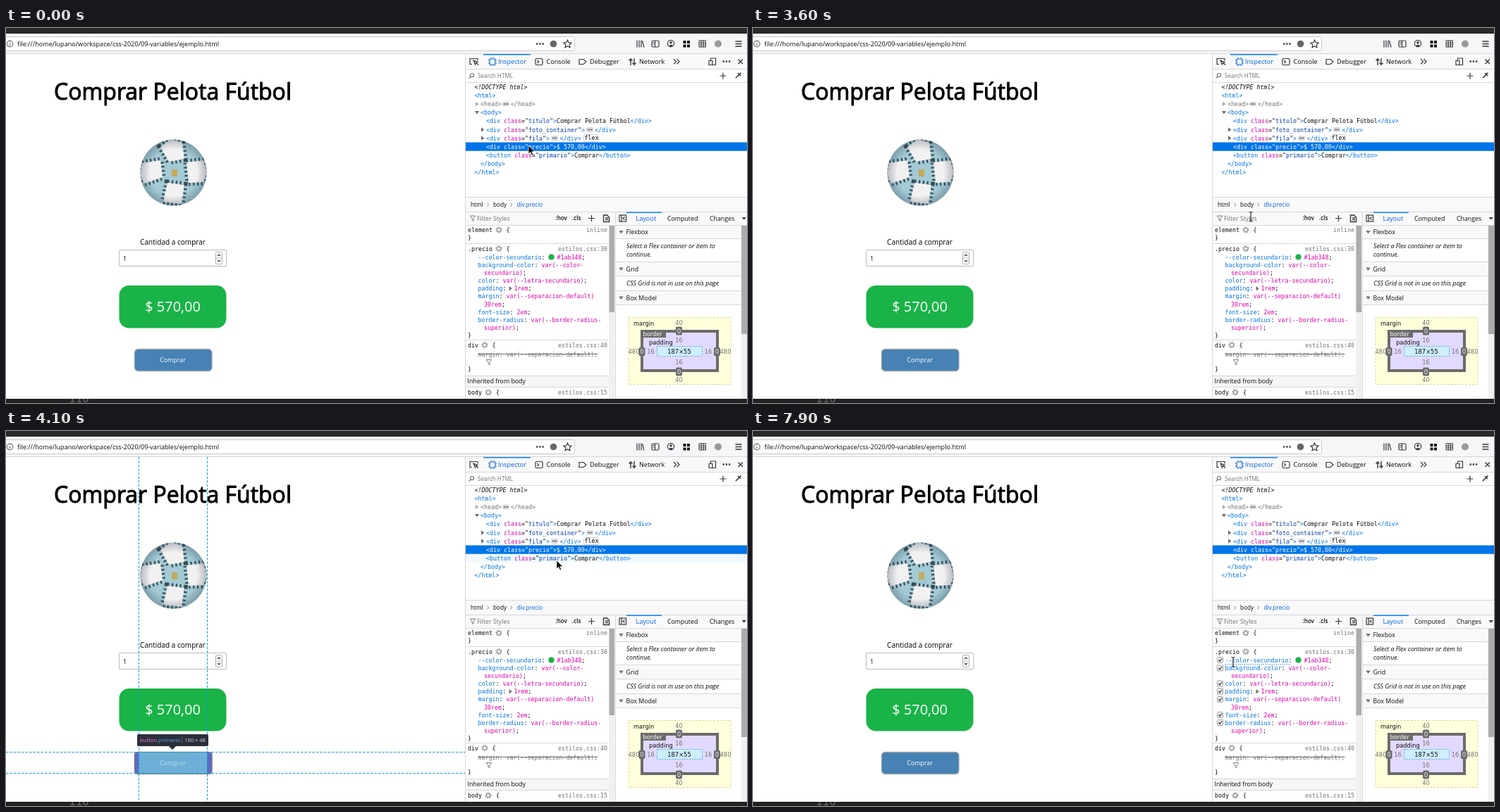
Recreate the animation shown at these times as an HTML page. Size 1051x533 px, loop 8000 ms.

```html
<!DOCTYPE html>
<html lang="es">
<head>
<meta charset="utf-8">
<title>Variables CSS</title>
<style>
html, body { margin: 0; width: 100%; height: 100%; overflow: hidden; background: #fff; }
svg { display: block; }
text { font: 8.8px "Open Sans", "Noto Sans", sans-serif; fill: #0c0c0d; white-space: pre; }
.title { font-size: 32px; fill: #000; stroke: #000; stroke-width: 1; stroke-linejoin: round; }
.label { font-size: 10.05px; fill: #000; }
.total { font-size: 20px; fill: #fff; }
.buy { font-size: 8.9px; fill: #fff; }
.tab { font-size: 9.1px; }
.crumb { font-size: 8.2px; }
.pseudo { font-size: 8px; font-weight: 600; }
.head { font-weight: 500; }
.dim { fill: #737373; }
.blue { fill: #0060df; }
.it { font-style: italic; }
.mid { text-anchor: middle; }
.end { text-anchor: end; }
.mono text, text.mono { font: 8.3px "DejaVu Sans Mono", monospace; }
.mono .it { font-style: italic; }
.mono .end { fill: #737373; }
.box text { font: 8.3px "DejaVu Sans", sans-serif; }
.t, .p { fill: #0074e8; }
.a, .v { fill: #dd00a9; }
.s { fill: #003eaa; }
.sel { fill: #fff; }
.line { fill: none; stroke: #38383d; stroke-width: 1.2; }
.dots { stroke: #444; stroke-width: 2.4; stroke-dasharray: 2.4 1.8; }
.rule { stroke: #d7d7db; fill: none; }
.guide { fill: none; stroke: #149ad2; stroke-dasharray: 3.44 2.06; }
.tip path { fill: #2b2f3a; }
.tip text { font-size: 7.7px; fill: #d7d7db; }
.tip .size { font-size: 7.4px; }
.tip .n { fill: #ee7be6; }
.tip .c { fill: #5fa9e8; }

.price, .body, .button, .row, .bodyRow, .checks, .name, .value, .arrow, .beam, .cursor {
  animation: 8s step-end infinite;
}
.price { animation-name: price; }
.body, .bodyRow { animation-name: body; }
.button { animation-name: button; }
.row { animation-name: row; }
.checks { animation-name: checks; }
.name { animation-name: name; }
.value { animation-name: value; }
.arrow { animation-name: arrow; }
.beam { animation-name: beam; }
.cursor { animation-name: move; }

@keyframes price { 0%, 37.5%, 65%, 100% { opacity: 0 } 2.5%, 53.75% { opacity: 1 } }
@keyframes body { 0%, 43.75%, 100% { opacity: 0 } 37.5% { opacity: 1 } }
@keyframes button { 0%, 53.75%, 66.25%, 100% { opacity: 0 } 51.25%, 65% { opacity: 1 } }
@keyframes row { 0%, 53.75%, 66.25%, 100% { opacity: 0 } 51.25%, 63.75% { opacity: 1 } }
@keyframes checks { 0%, 100% { opacity: 0 } 67.5% { opacity: 1 } }
@keyframes name { 0%, 81.25%, 100% { opacity: 0 } 72.5%, 92.5% { opacity: 1 } }
@keyframes value { 0%, 72.5%, 85%, 90%, 100% { opacity: 0 } 68.75%, 82.5%, 86.25% { opacity: 1 } }
@keyframes arrow { 0%, 48.75%, 100% { opacity: 1 } 45%, 67.5% { opacity: 0 } }
@keyframes beam { 0%, 48.75%, 100% { opacity: 0 } 45%, 67.5% { opacity: 1 } }
@keyframes move {
  0% { transform: translate(741px, 167px) }
  1.25% { transform: translate(740px, 167px) }
  2.5% { transform: translate(738px, 167px) }
  12.5% { transform: translate(767px, 163px) }
  13.75% { transform: translate(740px, 167px) }
  20% { transform: translate(721px, 165px) }
  21.25% { transform: translate(712px, 166px) }
  22.5% { transform: translate(702px, 168px) }
  23.75% { transform: translate(695px, 171px) }
  26.25% { transform: translate(696px, 171px) }
  27.5% { transform: translate(698px, 170px) }
  28.75% { transform: translate(699px, 169px) }
  30% { transform: translate(698px, 170px) }
  36.25% { transform: translate(697px, 178px) }
  37.5% { transform: translate(696px, 187px) }
  38.75% { transform: translate(696px, 192px) }
  43.75% { transform: translate(700px, 225px) }
  45% { transform: translate(706px, 268px) }
  46.25% { transform: translate(710px, 271px) }
  48.75% { transform: translate(762px, 198px) }
  50% { transform: translate(772px, 191px) }
  51.25% { transform: translate(781px, 184px) }
  52.5% { transform: translate(790px, 176px) }
  53.75% { transform: translate(797px, 165px) }
  56.25% { transform: translate(799px, 168px) }
  63.75% { transform: translate(790px, 189px) }
  65% { transform: translate(790px, 215px) }
  66.25% { transform: translate(792px, 252px) }
  67.5% { transform: translate(796px, 300px) }
  68.75% { transform: translate(803px, 328px) }
  71.25% { transform: translate(790px, 328px); animation-timing-function: steps(3) }
  75% { transform: translate(700px, 328px) }
  77.5% { transform: translate(706px, 328px); animation-timing-function: steps(6) }
  85% { transform: translate(822px, 328px); animation-timing-function: steps(2) }
  87.5% { transform: translate(800px, 328px) }
  88.75% { transform: translate(795px, 328px); animation-timing-function: steps(8) }
  98.75%, 100% { transform: translate(681px, 328px) }
}
</style>
</head>
<body>
<svg width="1051" height="533" viewBox="0 0 1051 533">
<defs>
  <path id="open" d="M-3.2-2h6.4L0 2.4z" fill="#737373"/>
  <path id="shut" d="M-2-3.2v6.4L2.4 0z" fill="#737373"/>
  <g id="more"><rect x="-5" y="-4" width="10" height="7" rx="2" fill="#dcdce0"/><path d="M-3-.5H4" stroke="#38383d" stroke-width="1.4" stroke-dasharray="1.4 1"/></g>
  <g id="gear" fill="none" stroke="#777"><circle r="2.6"/><circle r="3.9" stroke-width="1.4" stroke-dasharray="1.3 1.76"/></g>
  <g id="check"><rect x="-4" y="-4" width="8" height="8" rx="1" fill="#fff" stroke="#999"/><path d="M-2.2 0-.5 2 2.4-2.2" fill="none" stroke="#333" stroke-width="1.3"/></g>
  <path id="funnel" d="M-3.8-3.5h7.6L1 0v4L-1 2.6V0z" fill="none" stroke="#737373" stroke-width=".9"/>
  <g id="zero"><rect x="-4.5" y="-6" width="9" height="12" rx="2" fill="#6b6b6b"/><text class="mid sel" y="3">0</text></g>
  <clipPath id="foot"><path d="M0 527h651v6H0z"/></clipPath>
  <clipPath id="disc"><circle cx="237.5" cy="205.5" r="47"/></clipPath>
  <radialGradient id="shade"><stop offset=".7" stop-color="#234" stop-opacity="0"/><stop offset="1" stop-color="#234" stop-opacity=".3"/></radialGradient>
  <path id="panels" d="M219 169 234 158 250 163 253 186 231 190zM193 192l26-4 3 24-26 9-6-12zM256 191l24-3 5 18-5 13-21 1zM229 220l24 3-4 27-26-3z"/>
</defs>

<!-- browser bar -->
<path d="M0 0h1051v533H0z" fill="#fff"/>
<path d="M0 0h1051v8H0z" fill="#292929"/>
<path d="M0 8h1051v29H0z" fill="#f5f6f7"/>
<rect x="-6" y="12.5" width="812.5" height="20" rx="2" fill="#fff" stroke="#c9c9ce"/>
<path class="rule" d="M0 36.5h1051"/>
<g class="line"><circle cx="5.5" cy="22.5" r="4.3" stroke="#737373"/><path d="M5.5 21.5v3.4M5.5 19.4v1.2" stroke="#737373"/></g>
<text class="tab" x="16" y="25.5">file:///home/lupano/workspace/css-2020/09-variables/ejemplo.html</text>
<path class="dots" d="M752 22.5h11"/>
<circle cx="776.5" cy="22.5" r="4.8" fill="#666"/>
<path class="line" d="m796.5 17 1.6 3.7 4 .4-3 2.7.9 4-3.5-2.1-3.5 2.1.9-4-3-2.7 4-.4z"/>
<g class="line">
  <path d="M895 17.5v10M898 17.5v10M901 17.5v10M902.5 18l2.5 9.5"/>
  <rect x="916" y="18" width="10" height="9" rx="1.5"/><path d="M920.5 18v9M917.5 20.5h2M917.5 23h2"/>
  <circle cx="943" cy="22" r="4.6"/>
  <path d="M983 17.8h9.5V27H983zM983 21h9.5M983 24h9.5M986.2 17.8V27M989.4 17.8V27" stroke-width="1"/>
  <path d="M1034.5 19h9M1034.5 22.5h9M1034.5 26h9" stroke-width="1.5"/>
</g>
<path d="M940 25.5q3-3.5 6 0l-3 1.5zM941.3 20.7a1.7 1.7 0 1 1 3.4 0 1.7 1.7 0 1 1-3.4 0" fill="#38383d"/>
<path d="M960.5 18h4v4h-4zM966 18h4v4h-4zM960.5 23.5h4v4h-4zM966 23.5h4v4h-4z" fill="#111"/>
<circle cx="1010" cy="22.5" r="5" fill="#999"/>

<!-- page -->
<text class="title" x="68" y="102">Comprar Pelota Fútbol</text>
<g clip-path="url(#disc)">
  <path d="M190 158h95v95h-95z" fill="#a3cad5"/>
  <use href="#panels" fill="none" stroke="#3a4c56" stroke-width="9" stroke-dasharray="2.2 3.6"/>
  <use href="#panels" fill="#f2f1f2"/>
  <path d="M235 201h8v10h-8z" fill="#c3aa5c"/>
  <circle cx="237.5" cy="205.5" r="47.5" fill="url(#shade)"/>
</g>
<text class="label mid" x="236.5" y="307.5">Cantidad a comprar</text>
<rect x="160.5" y="315.5" width="152" height="23" rx="1.5" fill="#fff" stroke="#bbb"/>
<text class="tab" x="166" y="330.5">1</text>
<rect x="297.5" y="318.5" width="9" height="17" rx="2" fill="#fff" stroke="#aaa"/>
<path d="M298 327h9" stroke="#bbb"/><path class="line" d="m300 324 2-2 2 2M300 330l2 2 2-2"/>
<rect x="160.5" y="366" width="152" height="60.5" rx="14" fill="#1ab348"/>
<text class="total mid" x="236.5" y="403">$ 570,00</text>
<rect x="182.5" y="456.5" width="109.5" height="31" rx="5" fill="#4682b4" stroke="#9ba3aa" stroke-width="1.3"/>
<text class="buy mid" x="236.5" y="474.5">Comprar</text>

<!-- highlighters -->
<g class="body">
  <path d="M0 66h646v424H0z" fill="#87ceeb" opacity=".6"/>
  <path class="guide" d="M645.5 37v490M0 66.5h651M0 489.5h651"/>
</g>
<g class="price">
  <g opacity=".6" fill-rule="evenodd">
    <path d="M0 338h646v116H0z M161 366v61h151.5v-61z" fill="#edff64"/>
    <path d="M161 366h151.5v61H161z M172 377.5v38h129.5v-38z" fill="#6a5acd"/>
    <path d="M172 377.5h129.5v38H172z" fill="#87ceeb"/>
  </g>
  <path class="guide" d="M171.5 37v490M301.5 37v490M0 377.5h651M0 415.5h651"/>
  <g class="tip">
    <path d="M198 315h76q2 0 2 2v13q0 2-2 2h-33l-5 5-5-5h-33q-2 0-2-2v-13q0-2 2-2z"/>
    <text x="200" y="326.3"><tspan class="n">div</tspan><tspan class="c">.precio</tspan></text>
    <path d="M239.5 319v9" stroke="#666"/>
    <text class="size" x="243.5" y="326.3">219 × 87</text>
  </g>
</g>
<g class="button">
  <g opacity=".6">
    <path d="M182 456h110.5v31.5H182z" fill="#555"/>
    <path d="M183 457h108.5v30H183z" fill="#6a5acd"/>
    <path d="M188 457h97v30h-97z" fill="#87ceeb"/>
  </g>
  <path class="guide" d="M188.5 37v490M285.5 37v490M0 456.5h651M0 486.5h651"/>
  <g class="tip">
    <path d="M188 431h97q2 0 2 2v13q0 2-2 2h-44l-5 5-5-5h-43q-2 0-2-2v-13q0-2 2-2z"/>
    <text x="190" y="442.3"><tspan class="n">button</tspan><tspan class="c">.primario</tspan></text>
    <path d="M249.5 435v9" stroke="#666"/>
    <text class="size" x="253.5" y="442.3">160 × 48</text>
  </g>
</g>

<!-- devtools tabs -->
<path d="M651 37h400v490H651z" fill="#fff"/>
<path d="M652 37h399v21H652zM652 241h399v39H652z" fill="#f9f9fa"/>
<path class="rule" d="M651.5 37v490M652 58.5h399M652 77.5h399M652 240.5h399M652 261.5h399M652 280.5h399"/>
<path d="M677 37h67v1.4h-67zM880 261.5h50v1.4h-50z" fill="#0a84ff"/>
<g class="line">
  <path d="M661 51.5h-3v-8h11v3M663 46l6 2.5-2.5 1-1 2.5zM667 49.5l3 3"/>
  <g stroke="#0060df"><rect x="686" y="44" width="8" height="8" rx="1"/><path d="M684 46h1M684 50h1M695 46h1M695 50h1M688 42v1M692 42v1M688 53v1M692 53v1"/></g>
  <rect x="751" y="43.5" width="10" height="9" rx="1.5"/><path d="m753.5 46 2 2-2 2"/>
  <path d="M813 44.5h6l4 3.5-4 3.5h-6z"/>
  <path d="M886 53v-9l-2.5 2.5M886 44l2.5 2.5M891 43v9l-2.5-2.5M891 52l2.5-2.5" stroke-width="1.4"/>
  <path d="m947 44 3.5 3.7-3.5 3.7M951.5 44l3.5 3.7-3.5 3.7"/>
  <path d="M999.5 46v-3h7v9.5h-4M997 46.5h5v6h-5z"/>
  <path d="m1038.5 44.5 6.5 6.5M1045 44.5l-6.5 6.5" stroke-width="1.4"/>
  <circle cx="661" cy="67" r="2.5" stroke="#737373"/><path d="m659 69-2.5 2.5" stroke="#737373"/>
  <path d="M1012.5 68h9M1017 63.5v9"/><path d="m1035 71 4.5-4.5M1038 64l4 4M1040 66l2.5-2.5" stroke-width="1.7"/>
</g>
<path class="dots" d="M1016.5 47.5h11"/>
<text class="tab blue" x="698" y="51">Inspector</text>
<text class="tab" x="766.5" y="51">Console</text>
<text class="tab" x="828" y="51">Debugger</text>
<text class="tab" x="898" y="51">Network</text>
<text class="crumb dim" x="669" y="71">Search HTML</text>

<!-- markup tree -->
<path class="row" d="M652 174.7h399v12.1H652z" fill="#f0f9fe"/>
<path class="bodyRow" d="M652 186.8h399v12.1H652z" fill="#f0f9fe"/>
<path d="M652 162.6h399v12.1H652z" fill="#0074e8"/>
<g class="mono">
  <text class="it" x="664.5" y="87">&lt;!DOCTYPE html&gt;</text>
  <text class="t" x="664.5" y="99">&lt;html&gt;</text>
  <text class="dim" x="673" y="111">&lt;head&gt;</text><text class="dim" x="716" y="111">&lt;/head&gt;</text>
  <text class="t" x="673" y="123">&lt;body&gt;</text>
  <text x="681" y="135.3"><tspan class="t">&lt;div </tspan><tspan class="a">class</tspan>="<tspan class="s">titulo</tspan>"<tspan class="t">&gt;</tspan>Comprar Pelota Fútbol<tspan class="t">&lt;/div&gt;</tspan></text>
  <text x="681" y="147.5"><tspan class="t">&lt;div </tspan><tspan class="a">class</tspan>="<tspan class="s">foto_container</tspan>"<tspan class="t">&gt;</tspan></text>
  <text class="t" x="835" y="147.5">&lt;/div&gt;</text>
  <text x="681" y="159.6"><tspan class="t">&lt;div </tspan><tspan class="a">class</tspan>="<tspan class="s">fila</tspan>"<tspan class="t">&gt;</tspan></text>
  <text class="t" x="785.5" y="159.6">&lt;/div&gt;</text>
  <text class="sel" x="681" y="172">&lt;div class="precio"&gt;$ 570,00&lt;/div&gt;</text>
  <text x="681" y="184"><tspan class="t">&lt;button </tspan><tspan class="a">class</tspan>="<tspan class="s">primario</tspan>"<tspan class="t">&gt;</tspan>Comprar<tspan class="t">&lt;/button&gt;</tspan></text>
  <text class="t" x="673" y="196">&lt;/body&gt;</text>
  <text class="t" x="664.5" y="208.3">&lt;/html&gt;</text>
  <rect x="819.5" y="151.5" width="21" height="10" rx="2" fill="#fafafa" stroke="#d0d0d4"/>
  <text x="820.5" y="159.3">flex</text>
</g>
<use href="#shut" x="668" y="108" opacity=".6"/><use href="#open" x="668" y="120"/>
<use href="#shut" x="676" y="144.5"/><use href="#shut" x="676" y="156.5"/>
<use href="#more" x="709" y="108.5"/><use href="#more" x="828" y="145"/><use href="#more" x="778" y="157"/>

<!-- breadcrumbs and toolbars -->
<text class="crumb" x="659" y="254">html</text>
<text class="crumb" x="691" y="254">body</text>
<text class="crumb blue" x="724.5" y="254">div.precio</text>
<path d="m682.5 248.5 2.2 2.5-2.2 2.5M715.5 248.5l2.2 2.5-2.2 2.5" fill="none" stroke="#888"/>
<use href="#funnel" x="662" y="270.5"/>
<text class="dim" x="668" y="273.5">Filter Styles</text>
<text class="pseudo" x="779.5" y="273.3">:hov</text>
<text class="pseudo" x="803" y="273.3">.cls</text>
<g class="line">
  <path d="M826 270.5h9M830.5 266v9"/>
  <path d="M847.5 266h5l3 3v6.5h-8zM850 270h4M850 272.5h4" stroke-width="1.4"/>
  <rect x="870" y="266" width="9.5" height="9"/><path d="M873 266v9M877.5 268.5l-2.5 2 2.5 2"/>
</g>
<text class="tab blue" x="893.5" y="273.5">Layout</text>
<text x="938" y="273.5">Computed</text>
<text x="998" y="273.5">Changes</text>
<path d="M1043.5 269h6.5l-3.2 3.5z" fill="#38383d"/>

<!-- style rules -->
<path d="M652 495h203v15H652z" fill="#f5f5f6"/>
<path class="rule" d="M652 306.5h203M652 443.5h203M652 494.5h203M652 510.5h203"/>
<g class="mono">
  <text x="655" y="290">element</text><text x="709.5" y="290">{</text><text class="end" x="853" y="290">inline</text>
  <text x="655" y="301">}</text>
  <text x="655" y="316.5">.precio</text><text x="709.5" y="316.5">{</text><text class="end" x="853" y="316.5">estilos.css:30</text>
  <text x="669.5" y="328.6"><tspan class="p">--color-secundario</tspan>:</text><text x="781.5" y="328.6"><tspan class="v">#1ab348</tspan>;</text>
  <text x="669.5" y="339.8"><tspan class="p">background-color</tspan>: <tspan class="v">var(--color-</tspan></text>
  <text x="678" y="351"><tspan class="v">secundario)</tspan>;</text>
  <text x="669.5" y="362"><tspan class="p">color</tspan>: <tspan class="v">var(--letra-secundario)</tspan>;</text>
  <text x="669.5" y="373.2"><tspan class="p">padding</tspan>:</text><text x="720.5" y="373.2"><tspan class="v">1rem</tspan>;</text>
  <text x="669.5" y="384.4"><tspan class="p">margin</tspan>: <tspan class="v">var(--separacion-default)</tspan></text>
  <text x="678" y="395.6"><tspan class="v">30rem</tspan>;</text>
  <text x="669.5" y="406.8"><tspan class="p">font-size</tspan>: <tspan class="v">2em</tspan>;</text>
  <text x="669.5" y="418"><tspan class="p">border-radius</tspan>: <tspan class="v">var(--border-radius-</tspan></text>
  <text x="678" y="429"><tspan class="v">superior)</tspan>;</text>
  <text x="655" y="439.5">}</text>
  <text x="655" y="453.5">div</text><text x="689.5" y="453.5">{</text><text class="end" x="853" y="453.5">estilos.css:40</text>
  <text class="dim" x="669.5" y="466.5">margin: var(--separacion-default);</text>
  <text x="655" y="488">}</text>
  <text x="655" y="521">body</text><text x="695" y="521">{</text><text class="end" x="853" y="521">estilos.css:15</text>
</g>
<path d="M669.5 463.5h170" stroke="#777"/>
<circle cx="773.5" cy="325.5" r="4.3" fill="#1ab348" stroke="#ccc" stroke-width=".6"/>
<use href="#shut" x="715.5" y="370.3"/>
<use href="#gear" x="699" y="287"/><use href="#gear" x="699" y="313.5"/><use href="#gear" x="679" y="450.5"/><use href="#gear" x="684" y="518"/>
<use href="#funnel" x="685" y="475"/>
<text class="head" x="654.5" y="504.5">Inherited from body</text>
<g class="checks">
  <use href="#check" x="662.5" y="325.5"/><use href="#check" x="662.5" y="337"/><use href="#check" x="662.5" y="359"/>
  <use href="#check" x="662.5" y="370"/><use href="#check" x="662.5" y="381.5"/><use href="#check" x="662.5" y="403.5"/><use href="#check" x="662.5" y="414.5"/>
</g>
<path class="name" d="M669.5 331.5H761" stroke="#4b8fd6" stroke-dasharray="1.5"/>
<path class="value" d="M781.5 331.5H817" stroke="#dd00a9" stroke-dasharray="1.5"/>
<path d="M855 281h8.5v246H855zM1043 281h8v246h-8z" fill="#f0f0f0"/>
<path d="M855.5 281h7.5v123h-7.5zM1043 281h8v154h-8z" fill="#acacac"/>
<path class="rule" d="M864.5 262v265"/>

<!-- layout panel -->
<path d="M865 281h178v18H865zM865 333h178v19H865zM865 374h178v19H865z" fill="#f9f9fa"/>
<path class="rule" d="M865 299.5h178M865 332.5h178M865 352.5h178M865 373.5h178M865 393.5h178"/>
<use href="#open" x="872.5" y="290"/><use href="#open" x="872.5" y="342.5"/><use href="#open" x="872.5" y="383.5"/>
<text class="head" x="879.5" y="292.5">Flexbox</text>
<text class="head" x="879.5" y="345.5">Grid</text>
<text class="head" x="879.5" y="386.5">Box Model</text>
<text class="it" x="880" y="313">Select a Flex container or item to</text>
<text class="it" x="880" y="325">continue.</text>
<text class="it" x="880" y="366">CSS Grid is not in use on this page</text>
<g class="box">
  <rect x="883" y="411.5" width="145" height="95" fill="#ffffdb" stroke="#d9d98a" stroke-dasharray="3 2"/>
  <rect x="902" y="431" width="107" height="56" fill="#e2d9ff" stroke="#6b6b6b" stroke-width="4"/>
  <rect x="923.5" y="452.5" width="64" height="14" fill="#cdeefb" stroke="#5fb4d8" stroke-dasharray="2 1.5"/>
  <path d="M902 430h34v10h-34z" fill="#6b6b6b"/>
  <text x="890" y="423">margin</text>
  <text class="sel" x="903.5" y="438">border</text>
  <text x="912" y="450">padding</text>
  <text class="mid" x="955" y="463">187×55</text>
  <g class="mid">
    <text class="dim" x="954.5" y="421.5">40</text><text class="dim" x="954.5" y="503">40</text>
    <text class="dim" x="954.5" y="447">16</text><text class="dim" x="954.5" y="478">16</text>
    <text class="dim" x="914.5" y="463">16</text><text class="dim" x="996" y="463">16</text>
    <text class="dim" x="890.5" y="463">480</text><text class="dim" x="1020.5" y="463">480</text>
  </g>
  <use href="#zero" x="954.5" y="430.5"/><use href="#zero" x="954.5" y="488.5"/>
  <use href="#zero" x="902" y="460"/><use href="#zero" x="1008.5" y="460"/>
</g>

<!-- editor strip below -->
<path d="M0 527h1051v6H0z" fill="#222"/>
<g clip-path="url(#foot)"><text class="mono" x="89" y="532" style="font-size:16px;fill:#686868">110</text></g>

<g class="cursor">
  <path class="arrow" d="M0 0v12l2.8-2.6 1.9 4.3 2-.9-1.9-4.1h3.9z" fill="#000" stroke="#fff" stroke-width=".7"/>
  <path class="beam" d="M-2.5-6.5Q0-6.5 0-5 0-6.5 2.5-6.5M0-5V5.5M-2.5 7Q0 7 0 5.500 0 7 2.5 7" fill="none" stroke="#222" stroke-width="1.1"/>
</g>
</svg>
</body>
</html>
```
